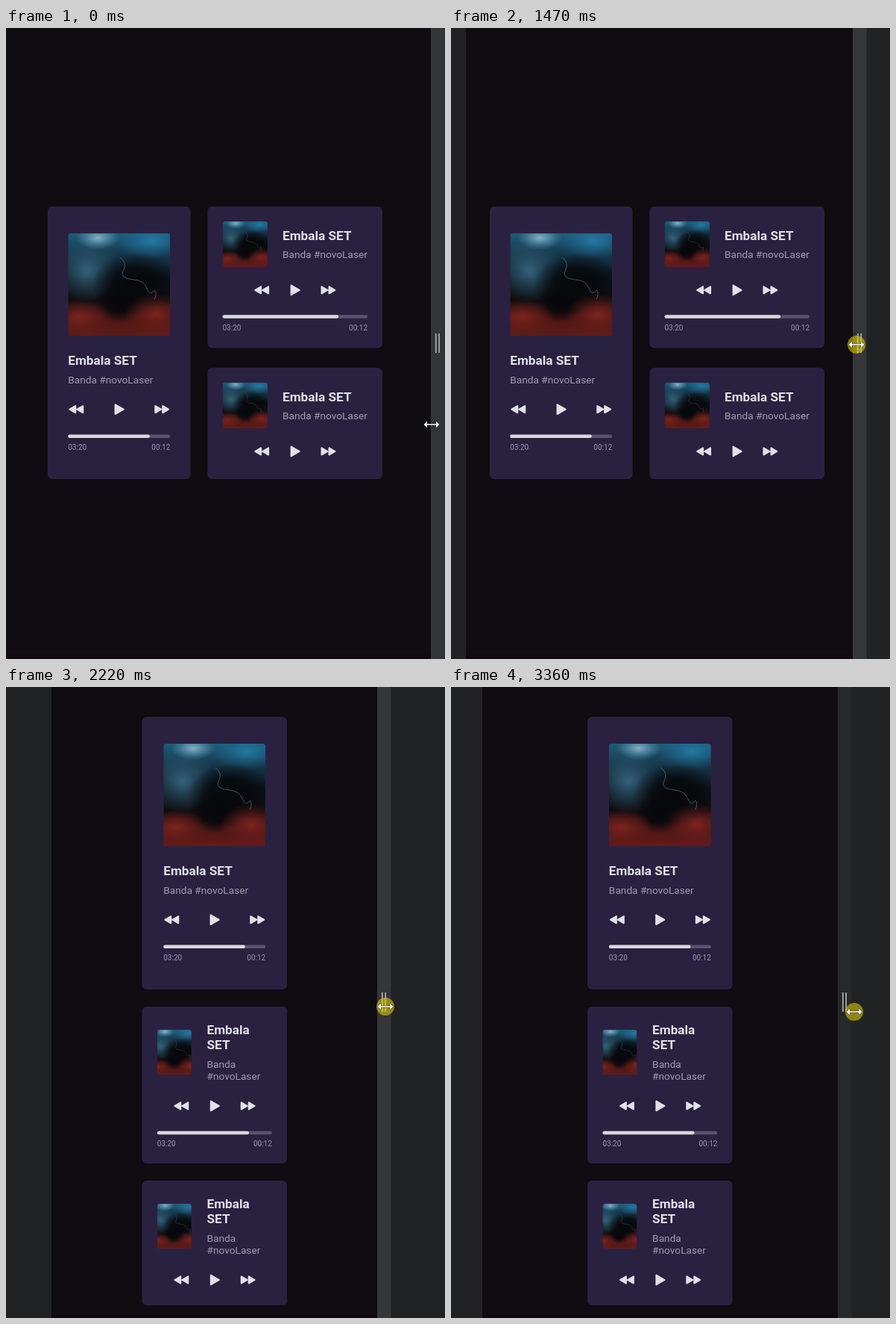
Write an HTML page that moves like this. It is 589 by 845 pixels and loops after 3430 ms.

```html
<!DOCTYPE html>
<html lang="pt">
<head>
<meta charset="utf-8">
<title>Music player</title>
<style>
  html, body { margin: 0; width: 100%; height: 100%; overflow: hidden; background: #0f0c12; }
  svg { display: block; }
  text { font-family: Roboto, sans-serif; }
  .title { font-size: 17.2px; font-weight: 700; fill: #e1e1e6; }
  .sub { font-size: 13.7px; fill: #a09bab; }
  .time { font-size: 10px; fill: #9a95a6; }
  .end { text-anchor: end; }
  .card { fill: #2a2141; }
  .icon { fill: #e1e1e6; stroke: #e1e1e6; stroke-width: 2; stroke-linejoin: round; }
  .wisp { fill: none; stroke: #7fb0c8; stroke-linecap: round; stroke-linejoin: round; }
</style>
</head>
<body>
<svg id="stage" width="589" height="845" viewBox="0 0 589 845">
  <defs>
    <linearGradient id="base" x1="0" y1="0" x2="0" y2="1">
      <stop offset="0" stop-color="#1f5c7a"/>
      <stop offset=".2" stop-color="#15394d"/>
      <stop offset=".45" stop-color="#0b141b"/>
      <stop offset=".66" stop-color="#110d10"/>
      <stop offset=".8" stop-color="#481614"/>
      <stop offset="1" stop-color="#611c19"/>
    </linearGradient>
    <radialGradient id="pale"><stop stop-color="#86b2c6"/><stop offset="1" stop-color="#5b98b5" stop-opacity="0"/></radialGradient>
    <radialGradient id="blue"><stop stop-color="#2579a4"/><stop offset="1" stop-color="#1d6890" stop-opacity="0"/></radialGradient>
    <radialGradient id="smoke"><stop stop-color="#34627a"/><stop offset="1" stop-color="#2c566d" stop-opacity="0"/></radialGradient>
    <radialGradient id="dark"><stop stop-color="#07080b"/><stop offset=".5" stop-color="#07080b" stop-opacity=".8"/><stop offset="1" stop-color="#07080b" stop-opacity="0"/></radialGradient>
    <radialGradient id="red"><stop stop-color="#7c241f"/><stop offset="1" stop-color="#6a1e1a" stop-opacity="0"/></radialGradient>
    <symbol id="cover" viewBox="0 0 137 137" preserveAspectRatio="xMidYMid slice">
      <rect width="137" height="137" fill="url(#base)"/>
      <ellipse cx="112" cy="10" rx="48" ry="24" fill="url(#blue)"/>
      <ellipse cx="26" cy="50" rx="46" ry="42" fill="url(#smoke)"/>
      <ellipse cx="90" cy="68" rx="58" ry="42" fill="url(#dark)"/>
      <ellipse cx="68" cy="94" rx="34" ry="26" fill="url(#dark)"/>
      <ellipse cx="40" cy="6" rx="30" ry="16" fill="url(#pale)"/>
      <ellipse cx="16" cy="112" rx="44" ry="24" fill="url(#red)"/>
      <ellipse cx="118" cy="108" rx="42" ry="28" fill="url(#red)"/>
      <path class="wisp" opacity=".45" d="M70 32q10 8 4 18t14 12q14 1 18 12t10 2q4 4 0 12"/>
    </symbol>
  </defs>
  <rect width="589" height="845" fill="#212223"/>
  <rect id="page" height="845" fill="#0f0c12"/>
  <rect id="edge" y="840" height="5" fill="#12050b" opacity=".5"/>
  <g id="wide"></g>
  <g id="narrow"></g>
  <g id="grip">
    <rect id="bar" width="18.5" height="845"/>
    <path d="M6.8 409V435M11.1 409V435" stroke="#abadb0" stroke-width="1.7"/>
  </g>
  <g id="cursor">
    <circle id="press" r="12" fill="#f0dc00" opacity=".53"/>
    <path d="M-10.5 0L-6-4.2V-.8H6V-4.2L10.5 0L6 4.2V.8H-6V4.2Z" fill="#fff" stroke="#111" stroke-width=".8" paint-order="stroke"/>
  </g>
</svg>
<script>
const $ = id => document.getElementById(id);
const TITLE = ['Embala', 'SET'], BAND = ['Banda', '#novoLaser'];
let clips = 0;

const label = (cls, x, y, s) => `<text class="${cls}" x="${x}" y="${y}">${s}</text>`;
const panel = (x, y, w, h) => `<rect class="card" x="${x}" y="${y}" width="${w}" height="${h}" rx="6"/>`;

function cover(x, y, w, h) {
  const id = 'clip' + clips++;
  return `<clipPath id="${id}"><rect x="${x}" y="${y}" width="${w}" height="${h}" rx="3.5"/></clipPath>
    <g clip-path="url(#${id})"><use href="#cover" x="${x}" y="${y}" width="${w}" height="${h}"/></g>`;
}

function controls(x, y, gap) {
  const skip = 'M-9 0L-1-4.6V4.6ZM1 0L9-4.6V4.6Z';
  return `<g class="icon" transform="translate(${x} ${y})">
    <path d="${skip}" transform="translate(${-gap})"/>
    <path d="M-5.2-6.4V6.4L6 0Z"/>
    <path d="${skip}" transform="translate(${gap}) scale(-1 1)"/></g>`;
}

function progress(x, y, w) {
  const line = (len, fill) => `<rect x="${x}" y="${y - 2.2}" width="${len}" height="4.4" rx="2.2" fill="${fill}"/>`;
  return line(w, '#5a536d') + line(w * .8, '#d9d9d9') +
    label('time', x, y + 18.3, '03:20') + label('time end', x + w, y + 18.3, '00:12');
}

function tallCard(x, y, w) {
  const left = x + (w - 137) / 2;
  return panel(x, y, w, 365) + cover(left, y + 36, 137, 137) +
    label('title', left, y + 212.3, TITLE.join(' ')) + label('sub', left, y + 237, BAND.join(' ')) +
    controls(left + 68.5, y + 271.7, 57.5) + progress(left, y + 307.7, 137);
}

function rowCard(x, y, h, full) {
  return panel(x, y, 234.5, h) + cover(x + 20, y + 20, 60.5, 61) +
    label('title', x + 100.5, y + 45, TITLE.join(' ')) + label('sub', x + 100.5, y + 69, BAND.join(' ')) +
    controls(x + 117.3, y + 112, 44.7) + (full ? progress(x + 20, y + 147.5, 194.5) : '');
}

function wrapCard(x, y, h, full) {
  const lines = (cls, words, top, step) =>
    words.map((s, i) => label(cls, x + 87, y + top + i * step, s)).join('');
  return panel(x, y, 194.5, h) + cover(x + 20.3, y + 31, 46, 60.5) +
    lines('title', TITLE, 36.5, 20.5) + lines('sub', BAND, 82, 16.2) +
    controls(x + 97.5, y + 133, 44.7) + (full ? progress(x + 20.3, y + 169, 154) : '');
}

// Cards are laid out around x = 0, the centre of the page.
$('wide').innerHTML = tallCard(-224.5, 239, 191.5) + rowCard(-10, 239, 189.5, true) + rowCard(-10, 455, 149);
$('narrow').innerHTML = tallCard(-97.3, 40, 194.5) + wrapCard(-97.3, 428, 210, true) + wrapCard(-97.3, 661, 167);

const LOOP = 3430, TICK = 67;
// start, steps, then: cursor x, cursor y, page left, page right, card centre
const MOVES = [
  [0, 1, 571, 531, -10, 570, 280.5],
  [70, 7, 573, 436, -10, 570, 280.5],
  [595, 4, 578, 426, -10, 570, 280.5],
  [1060, 2, 580, 424, -10, 570, 280.5],
  [1190, 1, 580, 424, -9, 569, 280.2],
  [1262, 4, 544, 424, 20, 539, 276.5],
  [1530, 1, 539, 424.5, 29, 531, 280],
  [1600, 2, 523, 426, 47, 514, 280.4],
  [1736, 3, 515, 427.5, 60, 500, 280],
  [2220, 1, 509, 428, 61, 498, 279.8],
  [2283, 2, 507, 428, 69, 492, 280.4],
  [2690, 1, 503, 428, 69, 492, 280.7],
  [2750, 4, 507, 430, 69, 492, 280.7],
  [3152, 4, 541, 435, 42, 519, 280.4]
];

function pose(t) {
  let state = MOVES[0].slice(2);
  for (const [start, steps, ...goal] of MOVES) {
    if (t < start) break;
    const p = Math.min(steps, Math.floor((t - start) / TICK) + 1) / steps;
    state = state.map((v, i) => v + (goal[i] - v) * p);
  }
  return state;
}

const move = (id, x, y = 0) => $(id).setAttribute('transform', `translate(${x} ${y})`);
const show = (id, on) => $(id).setAttribute('display', on ? 'inline' : 'none');

function draw(t) {
  const [x, y, left, right, centre] = pose(t);
  const stacked = right - left < 490, pressed = t >= 1060;
  const over = x >= right && x <= right + 18.5;
  for (const id of ['page', 'edge']) {
    $(id).setAttribute('x', left);
    $(id).setAttribute('width', right - left);
  }
  move('wide', centre);
  move('narrow', centre);
  show('wide', !stacked);
  show('narrow', stacked);
  move('grip', right);
  $('bar').setAttribute('fill', !over ? '#28292b' : pressed ? '#353638' : '#323437');
  move('cursor', x, y);
  show('press', pressed);
}

const begin = performance.now();
function tick() {
  draw((performance.now() - begin) % LOOP);
  requestAnimationFrame(tick);
}
tick();
</script>
</body>
</html>
```
